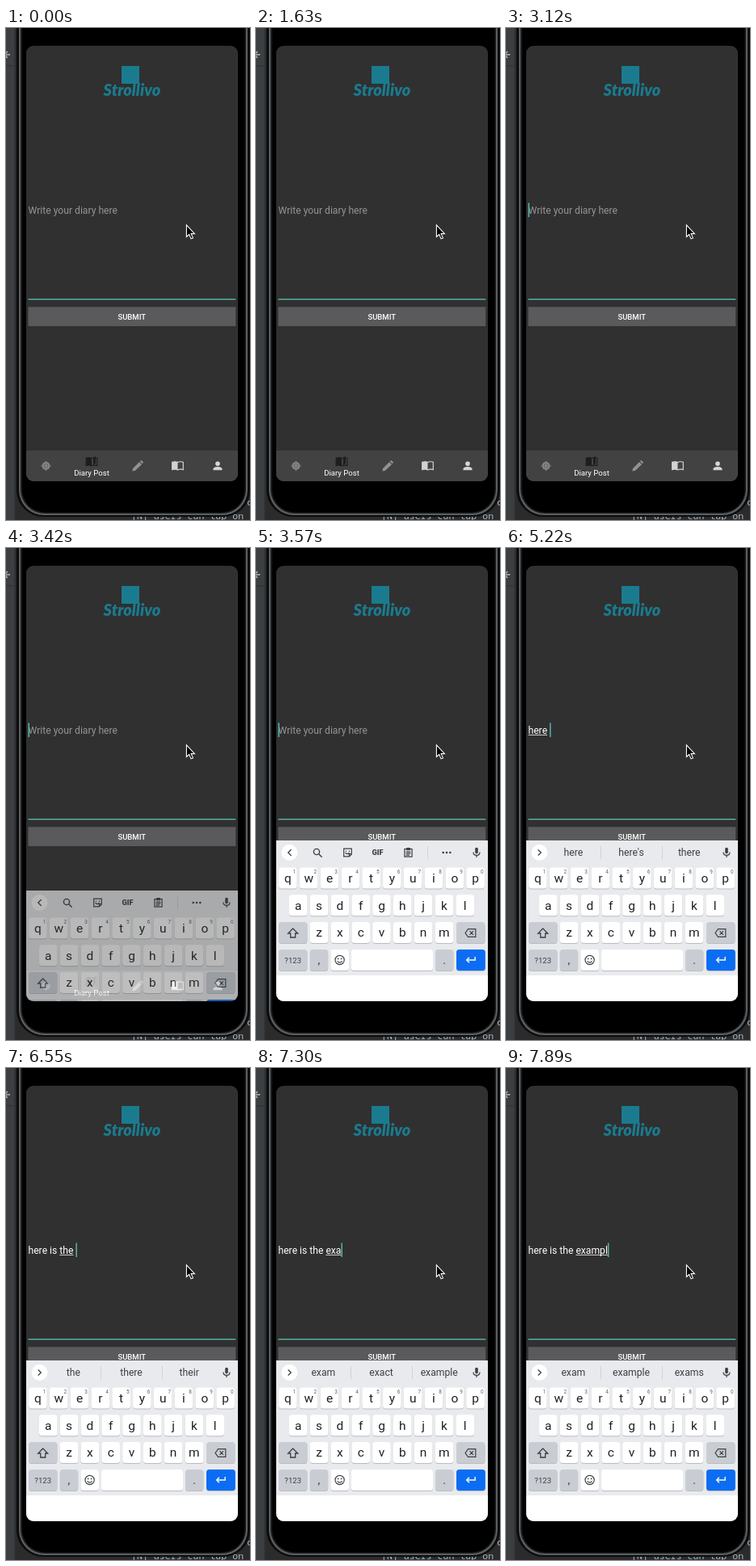
These frames come from a looping animation (302 by 609 pixels, 8 s). An HTML page with a canvas:

```html
<!DOCTYPE html>
<html lang="en">
<head>
<meta charset="utf-8">
<title>Diary post</title>
<style>
html, body { margin: 0; width: 100%; height: 100%; overflow: hidden; background: #2b2b2b; }
canvas { display: block; width: 302px; height: 609px; }
</style>
</head>
<body>
<canvas id="stage"></canvas>
<script>
const W = 302, H = 609, LOOP = 8000;
const ratio = window.devicePixelRatio || 1;

function prepare(canvas) {
  canvas.width = W * ratio;
  canvas.height = H * ratio;
  const c = canvas.getContext('2d');
  c.scale(ratio, ratio);
  return c;
}

const stage = prepare(document.getElementById('stage'));
const layer = prepare(document.createElement('canvas'));
let ctx = stage;

const FONT = 'Roboto, sans-serif';
const TEXT_FONT = '12.15px ' + FONT;
const TEAL = '#1a7b8f', INK = '#3c4043';

// Times at which the caret toggles before typing starts
const BLINKS = [150, 740, 1190, 1630, 2230, 2680, 3120, 3720, 4170];
const SLIDE = 3420, DOCKED = 3570;

// [time, settled text, underlined word, trailing text, suggestions]
const TYPING = [
  [4320, '', 'h', '', 'he how hi'],
  [4620, '', 'he', '', 'he hey her'],
  [4920, '', 'her', '', 'her here hers'],
  [5070, '', 'here', '', "here here's there"],
  [5220, '', 'here', ' ', "here here's there"],
  [5360, 'here ', '', '', 'is and to'],
  [5510, 'here ', 'i', '', 'is in it'],
  [5660, 'here ', 'is', '', "is isn't as"],
  [5810, 'here ', 'is', ' ', "is isn't as"],
  [5960, 'here is ', '', '', 'the a my'],
  [6260, 'here is ', 't', '', 'the to that'],
  [6400, 'here is ', 'the', '', 'the there their'],
  [6550, 'here is ', 'the', ' ', 'the there their'],
  [6700, 'here is the ', '', '', 'same best first'],
  [6850, 'here is the ', 'e', '', 'end each entire'],
  [7150, 'here is the ', 'ex', '', 'ex exact example'],
  [7300, 'here is the ', 'exa', '', 'exam exact example'],
  [7450, 'here is the ', 'exam', '', 'exam exact example'],
  [7600, 'here is the ', 'exam', '', 'exam example exams'],
  [7740, 'here is the ', 'examp', '', 'exam example exams'],
  [7890, 'here is the ', 'exampl', '', 'exam example exams']
];

function box(x, y, w, h, r, fill) {
  ctx.beginPath();
  ctx.roundRect(x, y, w, h, r);
  ctx.fillStyle = fill;
  ctx.fill();
}

function disc(x, y, r, fill) {
  ctx.beginPath();
  ctx.arc(x, y, r, 0, Math.PI * 2);
  ctx.fillStyle = fill;
  ctx.fill();
}

function label(str, x, y, font, fill, align = 'center') {
  ctx.font = font;
  ctx.textAlign = align;
  ctx.fillStyle = fill;
  ctx.fillText(str, x, y);
}

// Strokes an SVG path placed at x, y
function stroke(d, x, y, color, width = 1.2, fill) {
  ctx.save();
  ctx.translate(x, y);
  const p = new Path2D(d);
  if (fill) {
    ctx.fillStyle = fill;
    ctx.fill(p);
  }
  ctx.strokeStyle = color;
  ctx.lineWidth = width;
  ctx.stroke(p);
  ctx.restore();
}

function shape(d, x, y, fill) {
  ctx.save();
  ctx.translate(x, y);
  ctx.fillStyle = fill;
  ctx.fill(new Path2D(d));
  ctx.restore();
}

function drawDevice() {
  box(0, 0, W, H, 0, '#2b2b2b');
  box(0, 0, 10, H, 0, '#3c3f41');
  box(10, 0, 1.5, H, 0, '#323436');
  box(0, 46.5, 10, 1, 0, '#2d2f30');
  stroke('M5 0H-2M2 -4L-2 0L2 4', 0, 33, '#b4b6b8', 1.4);
  const mono = '500 11.6px "Noto Sans Mono", monospace';
  label('[N] users can tap on', 155, 608, mono, '#a9b7c6', 'left');
  label('c', 298, 591, mono, '#a9b7c6', 'left');
  box(13, -50, 289, 655, 33, '#0b0c0d');
  box(16, -50, 283, 653, 31, '#5c5f62');
  box(18, -50, 279, 651, 30, '#1b1c1d');
  box(20, -50, 275.5, 649.5, 28, '#000');
}

function book(x, y, color, half) {
  stroke('M-6.8 -4.6Q-3 -6 0 -4.4Q3 -6 6.8 -4.6V4.6Q3 3.4 0 5Q-3 3.4 -6.8 4.6Z', x, y, color, 1.2);
  shape(half, x, y, color);
}

function drawNav() {
  box(25, 523, 262, 38, 0, '#424242');
  disc(49.5, 542, 5, '#858585');
  stroke('M-6.2 0H6.2M0 -6.2V6.2', 49.5, 542, '#858585', 1.1);
  stroke('M-2.4 0A2.4 2.4 0 1 1 2.4 0A2.4 2.4 0 1 1 -2.4 0', 49.5, 542, '#5c5c5c', 0.8);
  book(106, 537, '#1d1d1d', 'M-6.8 -4.6Q-3 -6 0 -4.4V5Q-3 3.4 -6.8 4.6ZM2 -5L5 -7V2L2 4Z');
  label('Diary Post', 106, 553.5, '9.6px ' + FONT, '#fff');
  shape('M-6.6 6.6L-6 3.2L2 -4.8L5 -1.8L-3.2 6ZM2.8 -5.6L4.4 -7L7 -4.4L5.8 -2.6Z', 163, 542, '#929292');
  book(212.5, 542, '#d2d2d2', 'M-6.8 -4.6Q-3 -6 0 -4.4V5Q-3 3.4 -6.8 4.6Z');
  disc(262, 539.2, 2.8, '#d6d6d6');
  shape('M-5.5 5.2V3.6Q-4.5 1 0 1Q4.5 1 5.5 3.6V5.2Z', 262, 542, '#d6d6d6');
}

function drawPage() {
  box(25, 22, 262, 539, 0, '#303030');
  box(143, 47, 22, 22, 0, TEAL);
  label('Strollivo', 156, 84, 'italic 900 20px Lato, sans-serif', TEAL);
  box(27.5, 335, 256.8, 1.6, 0, '#55aea4');
  box(27.5, 345.2, 256.8, 24.2, 1, '#5a5a5c');
  box(27.5, 369.5, 256.8, 0.8, 0, '#262626');
  label('SUBMIT', 155.7, 361, '500 9.5px ' + FONT, '#fff');
  drawNav();
}

function drawEntry(entry, caret) {
  const left = 27.5, base = 230;
  let end = left;
  if (entry) {
    const [, settled, word, tail] = entry;
    label(settled + word + tail, left, base, TEXT_FONT, '#fff', 'left');
    const start = left + ctx.measureText(settled).width;
    const width = ctx.measureText(word).width;
    box(start, 231.2, width, 0.9, 0, '#fff');
    end = left + ctx.measureText(settled + word + tail).width;
  } else {
    label('Write your diary here', left, base, TEXT_FONT, '#949494', 'left');
  }
  if (caret) box(end, 216.5, 1.5, 17.5, 0, '#55b5aa');
}

function key(x, y, w, fill = '#fff') {
  box(x, y + 0.9, w, 26, 3.5, '#b9bcc1');
  box(x, y, w, 26, 3.5, fill);
}

function keyRow(chars, x, y, digits) {
  [...chars].forEach((c, i) => {
    const mid = x + i * 25.8;
    key(mid - 11.3, y, 22.6);
    label(c, mid, y + 18.3, '15.5px ' + FONT, '#202124');
    if (digits) label((i + 1) % 10, mid + 8.2, y + 7.5, '6.5px ' + FONT, '#5f6368');
  });
}

function drawTools() {
  ctx.lineCap = 'round';
  stroke('M2 -3.5L-1.5 0L2 3.5', 41.3, 377, INK, 1.3);
  stroke('M2.6 -1A3.6 3.6 0 1 1 -4.6 -1A3.6 3.6 0 1 1 2.6 -1M1.7 1.7L5.2 5.2', 76, 377, INK, 1.4);
  stroke('M-4.8 -4.8H4.8V2L2 4.8H-4.8ZM4.8 1.6H1.8V4.8M-2.6 0.4Q-0.5 3 1.6 0.4M-2 -2V-1.6M2 -2V-1.6', 113.5, 377, INK, 1.2);
  label('GIF', 150.5, 380.2, '900 9.2px ' + FONT, INK);
  stroke('M-4.6 -4.4H4.6V5.2H-4.6ZM-1.8 -5.4H1.8V-3.4H-1.8ZM-2.4 -0.8H2.4M-2.4 1.2H2.4M-2.4 3.2H1', 188.5, 377, INK, 1.2);
  box(212, 369, 1, 16, 0, '#d3d5d9');
  for (const dx of [-4.3, 0, 4.3]) disc(236 + dx, 377, 1.3, INK);
  ctx.lineCap = 'butt';
}

function drawSuggestions(words) {
  stroke('M-1.6 -3.5L2 0L-1.6 3.5', 41.3, 377, INK, 1.3);
  words.split(' ').forEach((w, i) => label(w, 83.3 + i * 71.7, 381.4, '12.2px ' + FONT, INK));
  box(117, 369, 1, 16, 0, '#d0d2d6');
  box(193, 369, 1, 16, 0, '#d0d2d6');
}

function drawKeys() {
  const grey = '#c9cdd3';
  keyRow('qwertyuiop', 39.4, 395.5, true);
  keyRow('asdfghjkl', 52.3, 429.3);
  keyRow('zxcvbnm', 78.1, 463);

  key(28, 463, 35.5, grey);
  stroke('M0 -6L6 0H3V5H-3V0H-6Z', 45.7, 477, INK, 1.3);
  key(248, 463, 35.5, grey);
  stroke('M-6.5 0L-3 -4.8H6.3V4.8H-3ZM-1 -2.3L3.6 2.3M3.6 -2.3L-1 2.3', 265.5, 476.5, INK, 1.2);

  const y = 497;
  key(28, y, 35.5, grey);
  label('?123', 45.7, y + 17, '9.6px ' + FONT, INK);
  key(66.8, y, 22.4, grey);
  label(',', 78, y + 18, '14px ' + FONT, INK);
  key(92.4, y, 22.6);
  stroke('M5.6 0A5.6 5.6 0 1 1 -5.6 0A5.6 5.6 0 1 1 5.6 0M-3 1.3Q0 5 3 1.3', 103.6, y + 13, INK, 1.2);
  disc(101.6, y + 11.4, 0.9, INK);
  disc(105.6, y + 11.4, 0.9, INK);
  key(118, y, 101);
  key(222, y, 22.4, grey);
  label('.', 233.2, y + 18, '14px ' + FONT, INK);
  key(248, y, 35.8, '#0b6df3');
  stroke('M5.5 -3.5V0.5H-5M-1.8 -2.8L-5 0.5L-1.8 3.8', 265.7, y + 12.5, '#fff', 1.4);
}

function drawKeyboard(words) {
  box(25, 362, 262, 167, 0, '#e8eaed');
  box(25, 529, 262, 32, 0, '#fff');
  disc(41.5, 377, 10, '#fff');
  if (words) drawSuggestions(words);
  else drawTools();
  box(271.2, 370.8, 3.6, 7.6, 1.8, INK);
  stroke('M-4 -0.5Q-4 3.4 0 3.4Q4 3.4 4 -0.5M0 3.4V6', 273, 377, INK, 1.2);
  drawKeys();
}

// Fades the whole keyboard as one sheet, so its keys do not add up
function drawRisingKeyboard(lift, alpha) {
  ctx = layer;
  ctx.clearRect(0, 0, W, H);
  drawKeyboard();
  ctx = stage;
  ctx.globalAlpha = alpha;
  ctx.drawImage(layer.canvas, 0, lift, W, H);
  ctx.globalAlpha = 1;
}

function drawPointer() {
  stroke('M0 0V14.6L3.3 11.6L5.6 17L8 16L5.7 10.7H10Z', 223.4, 243.9, '#fff', 1.1, '#000');
}

function draw(t) {
  const entry = TYPING.filter(s => s[0] <= t).pop();
  const caret = entry || BLINKS.filter(b => b <= t).length % 2 === 1;

  drawDevice();
  ctx.save();
  ctx.beginPath();
  ctx.roundRect(25, 22, 262, 539, 9);
  ctx.clip();
  drawPage();
  drawEntry(entry, caret);
  if (t >= DOCKED) drawKeyboard(entry && entry[4]);
  else if (t >= SLIDE) drawRisingKeyboard(62, 0.66);
  ctx.restore();
  drawPointer();
}

const begin = performance.now();
function tick() {
  draw((performance.now() - begin) % LOOP);
  requestAnimationFrame(tick);
}
tick();
</script>
</body>
</html>
```
